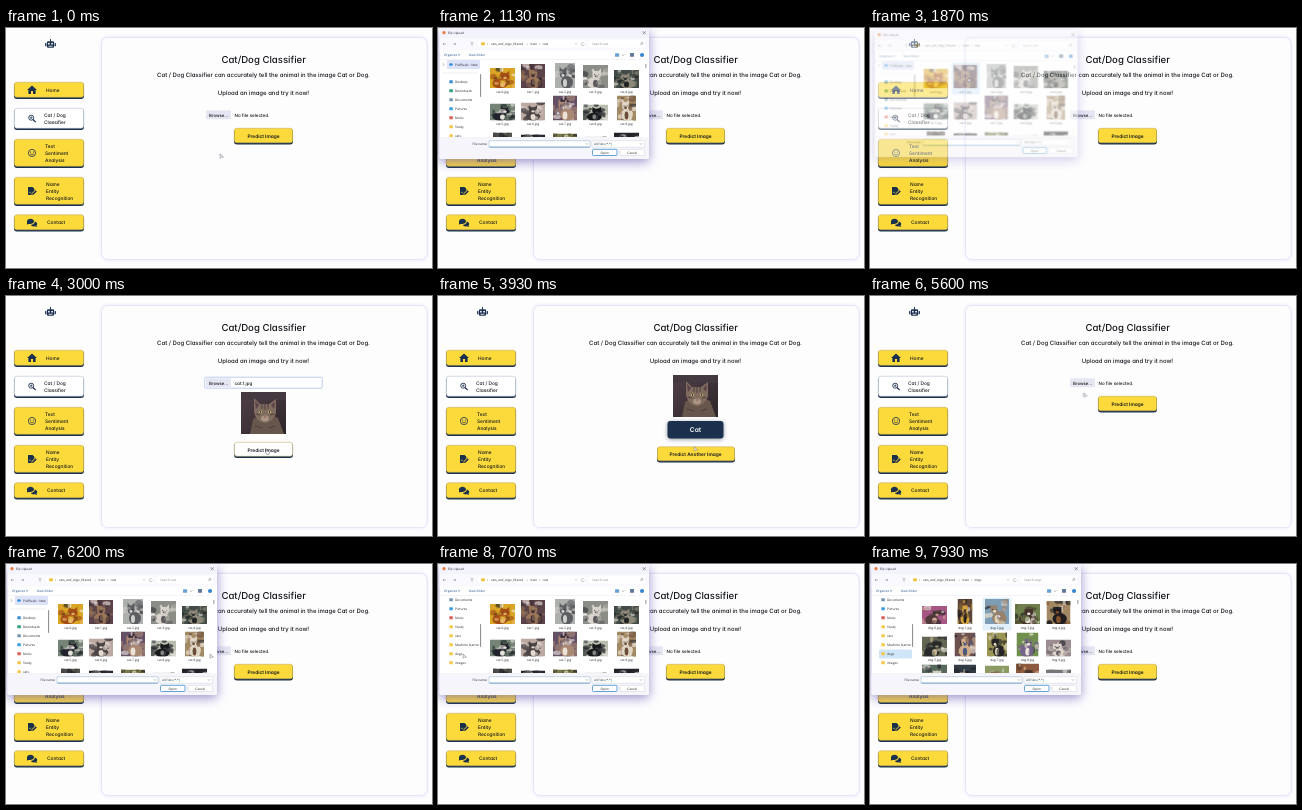
An HTML page that plays this animation: 426 by 240 pixels, repeating every 8 s.

```html
<!DOCTYPE html>
<html lang="en">
<head>
<meta charset="utf-8">
<title>Cat/Dog Classifier</title>
<style>
  html, body { margin: 0; width: 100%; height: 100%; overflow: hidden; background: #fdfdfe; }
  #stage { display: block; width: 100vw; height: 100vh; }
  text {
    font-family: Inter, sans-serif; font-weight: 500; fill: #14171c; white-space: pre;
    font-feature-settings: "cv11"; text-rendering: geometricPrecision;
  }
  .dialog text { font-family: "Open Sans", sans-serif; font-weight: 500; fill: #24252b; }
  .dialog { transform-origin: 106px 65px; filter: drop-shadow(0 3px 5.5px #6f62b8b0); }
  .mid { text-anchor: middle; }
</style>
</head>
<body>
<svg id="stage" viewBox="0 0 426 240" preserveAspectRatio="none"></svg>
<script>
const LOOP = 8000;
const NAVY = '#1b304c', YELLOW = '#fcda3c';

const rect = (x, y, w, h, fill, r = 0, more = '') =>
  `<rect x="${x}" y="${y}" width="${w}" height="${h}" rx="${r}" fill="${fill}" ${more}/>`;
const oval = (x, y, rx, ry, fill, more = '') => `<ellipse cx="${x}" cy="${y}" rx="${rx}" ry="${ry}" fill="${fill}" ${more}/>`;
const path = (d, fill, more = '') => `<path d="${d}" fill="${fill}" ${more}/>`;
const line = (d, color, width = .5) => path(d, 'none', `stroke="${color}" stroke-width="${width}"`);
const text = (x, y, s, size, more = '') => `<text x="${x}" y="${y}" font-size="${size}" ${more}>${s}</text>`;
const mid = (x, y, s, size, more = '') => text(x, y, s, size, `class="mid" ${more}`);
const group = (id, body, more = '') => `<g id="${id}" ${more}>${body}</g>`;
const at = (x, y, body) => `<g transform="translate(${x} ${y})">${body}</g>`;

// ---- page ----
function button(x, y, w, h, { id = '', fill = YELLOW, edge = '#b9a35a' } = {}) {
  return rect(x, y + 1, w, h - 1, NAVY, 3) +
    rect(x + .25, y + .25, w - .5, h - 2, fill, 2.8, `id="${id}" stroke="${edge}" stroke-width=".5"`);
}

const icons = {
  robot: rect(-3.6, -2.3, 7.2, 6.5, NAVY, 1.2) + rect(-5.4, -.6, 1.3, 3.4, NAVY, .5) + rect(4.1, -.6, 1.3, 3.4, NAVY, .5) +
    rect(-.5, -4.4, 1, 2.4, NAVY) + oval(-1.6, .2, .9, .9, '#fff') + oval(1.6, .2, .9, .9, '#fff') + rect(-2, 2.3, 4, .8, '#fff'),
  house: path('M-5 0L0-4.4L5 0H3.6V4H1V1H-1V4H-3.6V0Z', NAVY),
  zoom: `<circle cx="-.8" cy="-.8" r="2.5" fill="none" stroke="${NAVY}" stroke-width=".9"/>` +
    line('M1 1L3.7 3.7', NAVY, 1.2) + line('M-2.1-.8H.5M-.8-2.1V.5', NAVY, .7),
  smile: `<circle r="3.6" fill="none" stroke="${NAVY}" stroke-width=".8"/>` + oval(-1.3, -.9, .55, .55, NAVY) +
    oval(1.3, -.9, .55, .55, NAVY) + line('M-1.8 .9Q0 2.8 1.8 .9', NAVY, .7),
  sign: path('M-4-4H.6L2.4-2.2V-.5L-.4 2.4V4H-4Z', NAVY) + path('M.3 2.7L3.6-.8L4.8 .4L1.5 3.7L0 4Z', NAVY) +
    line('M-3 2.2L-2 .8L-1.2 2.2', YELLOW, .5),
  chat: path('M-5-1.2C-5-4.6 2-4.6 2-1.2C2 1.2-1.2 1.9-3 1.4L-5 2Z', NAVY) +
    path('M2.8-.9C6 0 5.6 2.6 4.4 3.1L5.2 4.4L2.8 3.8C.8 4.2-.8 3.2-1.2 2.4C1.4 2.2 2.8 1 2.8-.9Z', NAVY)
};

const nav = [
  ['house', 54, 17, 40, ['Home']],
  ['zoom', 80, 22, 38, ['Cat / Dog', 'Classifier']],
  ['smile', 111, 29, 39, ['Text', 'Sentiment', 'Analysis']],
  ['sign', 149, 29, 40, ['Name', 'Entity', 'Recognition']],
  ['chat', 186.5, 17, 41, ['Contact']]
].map(([icon, y, h, x, lines]) => {
  const middle = y + h / 2 - .5, active = icon === 'zoom';
  return button(8, y, 70, h, active ? { fill: '#fff', edge: '#a9b4cc' } : {}) + at(26, middle, icons[icon]) +
    lines.map((s, i) => text(x, middle + 1.8 + (i - (lines.length - 1) / 2) * 6.7, s, 4.8)).join('');
}).join('');

// Tabby portrait as flat tones
const portrait = rect(0, 0, 45, 42, 'url(#dusk)') + rect(0, 0, 45, 8, '#443941') +
  path('M9 42L12 27L24 20L37 26L43 42Z', '#66564c') +
  path('M13 6L19 12H28L35 7L35 21Q32 30 24 31Q15 30 13 20Z', '#806c5e') +
  path('M14 9L18 13L15 17ZM34 10L30 13L33 17Z', '#5a4247') +
  line('M21 12V17M24 12V18M27 12V17M15 22L19 23M33 22L29 23M14 34L21 36M34 34L28 36', '#4a3c39', .9) +
  oval(19.5, 20, 1.7, 1.3, '#c0b47c') + oval(28.5, 20, 1.7, 1.3, '#c0b47c') +
  oval(19.5, 20, .6, 1.1, '#25201e') + oval(28.5, 20, .6, 1.1, '#25201e') +
  oval(24, 26.5, 4, 3, '#aa9484') + path('M22.8 24.4H25.2L24 26Z', '#8b5552');

const browse = rect(200, 82.3, 25, 9, '#e6e6f3', 1) + text(203, 88.5, 'Browse...', 4.3);
const bold = 'style="font-weight:600"';

const page =
  rect(95.5, 9.5, 325.5, 222, '#fdfdfe', 6, 'stroke="#e8e4f8" stroke-width="1" style="filter:drop-shadow(0 0 1.5px #cfc6f077)"') +
  at(44.5, 15.5, icons.robot) + nav +
  mid(257.7, 35, 'Cat/Dog Classifier', 9.6) +
  mid(257.5, 49, 'Cat / Dog Classifier can accurately tell the animal in the image Cat or Dog.', 5.97) +
  mid(257.5, 67, 'Upload an image and try it now!', 5.97) +
  group('empty', browse + text(228.5, 88.5, 'No file selected.', 4.5) +
    button(228, 100, 59, 16.5) + mid(257.5, 109.7, 'Predict Image', 4.8, bold)) +
  group('chosen', rect(198.7, 81.2, 117.5, 11, '#fff', 1, 'stroke="#a3bbea" stroke-width=".7"') + browse +
    text(228.5, 88.5, 'cat.1.jpg', 4.5) + at(235, 96, portrait) +
    button(228, 146, 59, 16, { id: 'predict' }) + mid(257.5, 155.6, 'Predict Image', 4.8, bold)) +
  group('result', at(235, 79, portrait) +
    rect(229.5, 125, 56, 17.5, NAVY, 3, 'style="filter:drop-shadow(0 1px 2px #33415588)"') +
    mid(257.5, 136, 'Cat', 6.6, 'style="font-weight:600;fill:#fff"') +
    button(219, 150.5, 78, 16, { id: 'again' }) + mid(257.5, 160, 'Predict Another Image', 4.8, bold));

// ---- file dialog ----
const columns = [64.5, 95, 127, 157.5, 188.5];

// width, height, backdrop, coat, chest
const cats = [
  [25, 20, '#d9a524', '#a44d18', '#e7bb65'], [24, 24, '#5b4349', '#9b7659', '#3d2e34'], [20, 25, '#adb0ad', '#5c5e62', '#d0d0ca'],
  [25, 23, '#8b8d87', '#d8d3cb', '#5f5b60'], [25, 18, '#424b45', '#8e887a', '#202421'], [25, 17, '#758477', '#20232a', '#e5e2da'],
  [24, 18, '#bba9a2', '#4c4546', '#e5dbd0'], [24, 25, '#665066', '#a98974', '#eee2d7'], [25, 16, '#b8bcaf', '#17191d', '#34383a'],
  [19, 25, '#a48965', '#e1d6c6', '#6a4e37'], [19, 20, '#55544f', '#35342f', '#777'], [24, 18, '#20222a', '#373842', '#666'],
  [24, 19, '#797b4a', '#484731', '#aaa'], [22, 16, '#ccc', '#777', '#eee'], [25, 20, '#24242a', '#111318', '#444']
];
const dogs = [
  [25, 18, '#a65683', '#4e3a38', '#d3a498'], [15, 25, '#5b4433', '#d6a63d', '#221d1d'], [24, 25, '#7d9db5', '#98816a', '#e1d5bd'],
  [25, 20, '#6f7f4c', '#46352b', '#eee9e0'], [24, 23, '#a38963', '#201d20', '#82512d'], [25, 20, '#626653', '#292a2b', '#c9bb96'],
  [21, 24, '#6d5050', '#d0ae8b', '#465a84'], [20, 24, '#9a9455', '#262426', '#ded3ba'], [22, 24, '#71904e', '#75658a', '#eee4dc'],
  [25, 17, '#9b8d92', '#e0d5cc', '#635f66'], [25, 24, '#57685c', '#d2cebc', '#292f31'], [22, 24, '#333b44', '#1e2027', '#c5baa9'],
  [24, 23, '#8c9b63', '#8d6a50', '#ddd'], [23, 25, '#8d5b3f', '#4d372d', '#ddb68a'], [25, 19, '#77777a', '#bbb', '#555']
];

// Seeded 0..1 noise
const noise = (n) => { const v = Math.sin(n * 127.1 + 11.7) * 43758.5453; return v - Math.floor(v); };

function blotches(seed, w, h, colors) {
  return Array.from({ length: 9 }, (_, k) => {
    const n = seed * 60 + k * 5;
    return oval(noise(n) * w, noise(n + 1) * h, 1 + noise(n + 2) * w * .15, 1 + noise(n + 3) * h * .12,
      colors[k % colors.length], 'opacity=".6"');
  }).join('');
}

function thumb([w, h, back, coat, chest], i, kind) {
  const lean = (i * 7 % 5 - 2) * w / 20, ear = h * (kind === 'cat' ? .16 : .06);
  const headX = w / 2 - lean, headY = h * .42, r = w * .17;
  const pet = oval(w / 2 + lean, h * .77, w * .3, h * .25, coat) + oval(w / 2, h * .8, w * .1, h * .16, chest) +
    oval(headX, headY, r, h * .17, coat) +
    path(`M${headX - r} ${headY}v${-h * .12 - ear}l${r * .8} ${ear}h${r * .4}l${r * .8} ${-ear}v${h * .12 + ear}Z`, coat) +
    oval(headX, headY + h * .07, w * .07, h * .06, chest) +
    line(`M${headX - r * .6} ${headY}h1m${r * 1.2 - 2} 0h1`, '#15151a', .8);
  const row = Math.floor(i / 5), bottom = row < 2 ? 60 + row * 32.5 : 124.5;
  const seed = i + (kind === 'cat' ? 1 : 31);
  const photo = rect(0, 0, w, h, back) + blotches(seed, w, h, ['#1c1a20', '#efe9e2', coat]) + pet +
    blotches(seed + 70, w, h, [coat, back, chest]);
  return `<svg x="${columns[i % 5] - w / 2}" y="${bottom - h}" width="${w}" height="${h}" overflow="hidden">${photo}</svg>` +
    (row < 2 ? mid(columns[i % 5], bottom + 4.9, `${kind}.${i}.jpg`, 3.2) : '');
}
const thumbs = (list, kind) => list.map((item, i) => thumb(item, i, kind)).join('');

const sidebarIcon = { Desktop: '#3d8fd1', Downloads: '#34a178', Documents: '#7794ae', Pictures: '#3c9ee0', Music: '#d66156' };
const places = ['Desktop', 'Downloads', 'Documents', 'Pictures', 'Music', 'Study', 'cats', 'Machine learnin', 'dogs', 'images'];
const placeList = places.map((name, i) => {
  const y = 54 + i * 9;
  return rect(11.3, y - 1.7, 3.6, 3, sidebarIcon[name] || '#f3c84d', .5) + text(17, y + 1, name, 3.25);
}).join('');
const sidebar = group('places',
  rect(9, 32, 33, 9, '#dde3f8', 1) + line('M5 35.3l1.2 1.2l-1.2 1.2', '#666') + oval(13, 36.5, 1.8, 1.2, '#2f8bd8') +
  text(17, 37.6, 'PuffVault - New', 3.2) +
  line('M4 45H40', '#e0e0e8') + group('dogsRow', rect(9, 121.5, 33, 9, '#cfe6f9', 1)) + placeList);

const crumbs = (last) =>
  text(53, 17, 'cats_and_dogs_filtered', 3.05) + text(88.5, 17, '›', 3.5) + text(92.5, 17, 'train', 3.1) +
  text(101, 17, '›', 3.5) + text(104.5, 17, last, 3.1) + text(154, 17, `Search ${last}`, 3.1, 'style="fill:#85858e"');

const dialog =
  rect(1.5, 0, 209.5, 131, '#fff', 2) + rect(1.5, 0, 209.5, 10, '#f3f3fd', 2) + rect(1.5, 10, 209.5, 12.5, '#f9f9fe') +
  `<circle cx="6" cy="4.7" r="1.6" fill="#e77a3c"/>` + text(9.7, 5.8, 'File Upload', 3.1) +
  line('M204.8 3.2l3 3m0-3l-3 3', '#444') +
  line('M8 16H5m1.2-1.2L5 16l1.2 1.2M15 16h3m-1.2-1.2L18 16l-1.2 1.2M34 17.6v-3.2m-1.2 1.2L34 14.4l1.2 1.2', '#777', .45) +
  rect(40, 12, 107, 7.6, '#fff', 1) + rect(151, 12, 56, 7.6, '#fff', 1) + rect(43, 14.3, 4, 3, '#f1c54c', .5) + text(49, 17, '›', 3.5) +
  line('M145.5 14.7a1.5 1.5 0 1 0 .8 1.2M137 15.4l1 1l1-1', '#777', .4) + line('M202 17l1.2-1.2a1 1 0 1 1 .4 .4', '#666', .4) +
  text(6, 28.3, 'Organize ▾', 3.2, 'style="fill:#234f84"') + text(31, 28.3, 'New folder', 3.2, 'style="fill:#234f84"') +
  rect(177, 25.2, 4.2, 3.5, '#6aa3d5', .5) + line('M184 26.5l1 1l1-1', '#555') +
  rect(192, 25, 4, 3.8, '#5d7898', .5) + `<circle cx="204" cy="27" r="2" fill="#3483d1"/>` +
  line('M2 31.5H210M2 109.5H210', '#e4e4ee') +
  `<g clip-path="url(#sideClip)">${sidebar}</g>` +
  group('sideThumb', rect(42.2, 46, .9, 23, '#77777f', .4)) + rect(207.5, 36, .8, 4, '#77777f', .4) +
  `<g clip-path="url(#listClip)">` +
    group('pick', rect(81, 33.5, 29, 33, '#d5eafa', 1)) + group('hover', rect(112.5, 33.5, 29, 33, '#e2f0fb', 1)) +
    group('cats', thumbs(cats, 'cat')) + group('dogs', thumbs(dogs, 'dog')) + '</g>' +
  group('catPath', crumbs('cats')) + group('dogPath', crumbs('dogs')) +
  rect(1.5, 109.7, 209.5, 21.3, '#f5f5fb', 2) + text(34.5, 116.9, 'File name:', 3.1) +
  rect(51, 112.7, 101, 6.5, '#fff', .8, 'stroke="#8eaccd" stroke-width=".5"') +
  line('M51.3 119.1H151.7', '#377fbd', .6) + line('M148 115.4l1 1l1-1', '#666') +
  rect(154, 112.7, 52.5, 6.5, '#fff', .8, 'stroke="#c7c7d0" stroke-width=".4"') +
  text(156, 117, 'All Files (*.*)', 3.1) + line('M202 115.4l1 1l1-1', '#666') +
  rect(154.5, 121.3, 24.5, 6.2, '#fff', 1, 'stroke="#287fc4" stroke-width=".7"') + mid(166.7, 125.6, 'Open', 3.2) +
  rect(182, 121.3, 24.5, 6.2, '#fff', 1, 'stroke="#c5c5ce" stroke-width=".4"') + mid(194.2, 125.6, 'Cancel', 3.2);

const cursor =
  group('arrow', path('M0 0L.2 4.3L1.3 3.3L3.4 3Z', '#fff', 'stroke="#65627a" stroke-width=".5"')) +
  group('hand', path('M0 0q.8-.3 .9 .5v1.5l2.2 .5q.7 .4 .3 1.5l-.6 1.3H.6L-.9 3q.1-.8 .9-.2Z', '#fff', 'stroke="#4a4a58" stroke-width=".5"'));

document.getElementById('stage').innerHTML =
  `<defs>
    <linearGradient id="dusk" x1="0" y1="0" x2="1" y2="1"><stop stop-color="#514049"/><stop offset="1" stop-color="#2c2528"/></linearGradient>
    <clipPath id="sideClip">${rect(2, 32, 41, 77, '#000')}</clipPath>
    <clipPath id="listClip">${rect(44, 32, 163, 77, '#000')}</clipPath>
  </defs>` +
  rect(0, 0, 426, 240, '#fdfdfe') + page + group('dialog', dialog, 'class="dialog"') + group('cursor', cursor);

// ---- motion: rows of [ms, value, easing towards the next row] ----
function play(id, prop, rows) {
  const steps = [...rows, [LOOP, rows[rows.length - 1][1]]];
  document.getElementById(id).animate(
    steps.map(([ms, value, easing = 'step-end']) => ({ offset: ms / LOOP, [prop]: value, easing })),
    { duration: LOOP, iterations: Infinity });
}
// Visible only inside the given [from, to) spans
function show(id, ...spans) {
  const rows = spans.flatMap(([from, to]) => [[from, 1], [to, 0]]).filter(([ms]) => ms < LOOP);
  play(id, 'opacity', rows[0][0] ? [[0, 0], ...rows] : rows);
}
const move = (x, y) => `translate(${x}px, ${y}px)`;

show('empty', [0, 1980], [5270, LOOP]);
show('chosen', [1980, 3470]);
show('result', [3470, 5270]);

play('dialog', 'opacity', [[0, 0], [730, 0, 'ease-out'], [880, 1], [1790, 1, 'linear'], [1940, 0],
  [5870, 0, 'ease-out'], [6020, 1]]);
play('dialog', 'transform', [[0, 'scale(.94)'], [730, 'scale(.94)', 'ease-out'], [880, 'scale(1)'],
  [1790, 'scale(1)', 'linear'], [1940, 'scale(.94)'], [5870, 'scale(.94)', 'ease-out'], [6020, 'scale(1)']]);

show('cats', [0, 7330]);
show('catPath', [0, 7330]);
show('dogs', [7330, LOOP]);
show('dogPath', [7330, LOOP]);
show('dogsRow', [7200, LOOP]);
show('pick', [1400, 2000]);
show('hover', [7700, LOOP]);
play('places', 'transform', [[0, move(0, 0)], [6750, move(0, 0), 'ease-in-out'], [7070, move(0, -36)]]);
play('sideThumb', 'transform', [[0, move(0, 0)], [6750, move(0, 0), 'ease-in-out'], [7070, move(0, 14)]]);

play('predict', 'fill', [[0, YELLOW], [2670, YELLOW, 'ease'], [2900, '#fff']]);
play('again', 'fill', [[0, YELLOW], [4820, YELLOW, 'ease'], [5060, '#fff']]);

play('cursor', 'transform', [
  [0, 214, 126], [200, 214, 126], [530, 212, 88], [870, 212, 88], [1130, 119, 83], [1500, 98, 50], [1980, 98, 50],
  [2750, 260, 153], [3600, 260, 153], [4300, 252, 148], [4870, 238, 158], [5300, 238, 158], [5700, 210, 88],
  [6020, 204, 90], [6230, 204, 90], [6700, 25, 84], [7070, 25, 90], [7370, 25, 90], [7800, 128, 50]
].map(([ms, x, y]) => [ms, move(x, y), 'ease-in-out']));
show('arrow', [0, 2700], [3470, 4820], [5270, LOOP]);
show('hand', [2700, 3470], [4820, 5270]);
</script>
</body>
</html>
```
